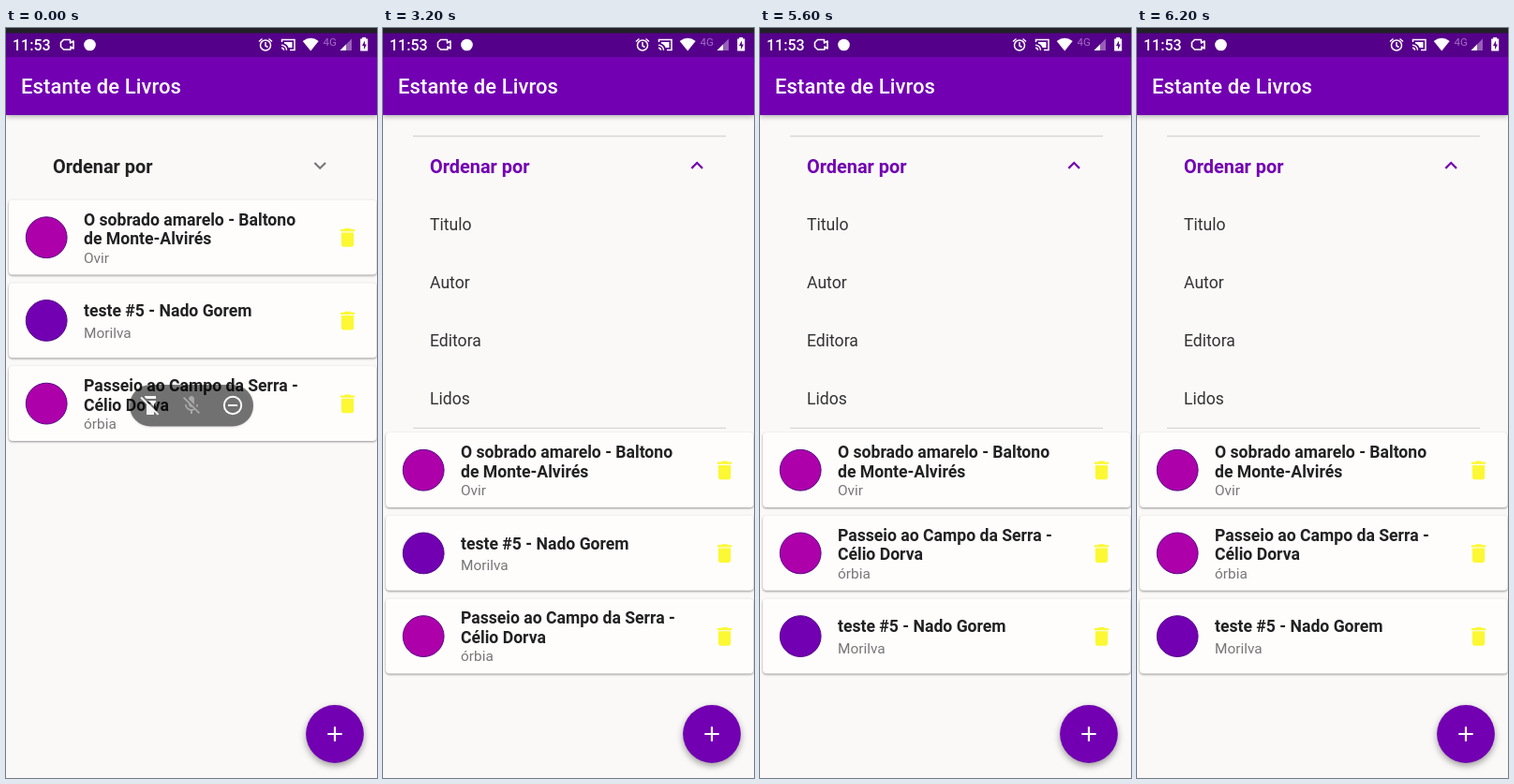
An HTML page for the animation above (8 s loop, 396 px wide and 801 px high).

```html
<!DOCTYPE html>
<html lang="pt-BR">
<head>
<meta charset="utf-8">
<title>Estante de Livros</title>
<style>
  html, body { margin: 0; width: 100%; height: 100%; overflow: hidden; background: #fbf9f8; }
  svg { display: block; width: 100%; height: 100%; font-family: Roboto, sans-serif; }
  .name { font-size: 17.6px; font-weight: 700; fill: #212121; }
  .publisher { font-size: 15.4px; fill: #787676; }
  .option { font-size: 17.6px; fill: #333; }
  .card { fill: #fefdfc; filter: drop-shadow(0 1.2px 1.2px rgba(0, 0, 0, .42)); }
  .bar { filter: drop-shadow(0 2.5px 2.5px rgba(0, 0, 0, .28)); }
  .fab { filter: drop-shadow(0 3px 3.5px rgba(0, 0, 0, .38)); }
  .line { fill: none; stroke: #fff; }
</style>
</head>
<body>
<svg viewBox="0 0 396 801" preserveAspectRatio="none">
  <rect width="396" height="801" fill="#fbf9f8"/>

  <g class="bar">
    <rect width="396" height="93" fill="#7200b2"/>
  </g>
  <rect width="396" height="31" fill="#55008a"/>
  <rect width="396" height="5.5" fill="#222126"/>
  <text x="16" y="70" font-size="22" font-weight="500" letter-spacing=".1" fill="#fff">Estante de Livros</text>

  <!-- status bar -->
  <g fill="#fff">
    <text x="7" y="23.6" font-size="16" font-weight="500">11:53</text>
    <path class="line" stroke-width="1.6" stroke-linejoin="round" d="M61.5 12.5h7v3.5l3.5-2v8l-3-2v3h-7.500l-3-3v-4.500z"/>
    <circle cx="89.500" cy="18" r="6.300"/>
    <g class="line" stroke-width="1.500">
      <circle cx="277" cy="18.500" r="5.500"/>
      <path d="M277 15v4l2.500 1.500M270 14.500l3.500-3M284 14.500l-3.500-3"/>
      <path d="M294.500 15v-2.500h13.500v11h-5M294 18.200a5.500 5.500 0 0 1 5.500 5.500M294 21.200a2.500 2.500 0 0 1 2.500 2.500"/>
    </g>
    <path d="M297 15h8.500v6h-4q-1-3.500-4.500-4.500z"/>
    <path d="M316.700 14q8.500-6.500 17 0l-8.500 10.500z"/>
    <text x="338.500" y="18.800" font-size="11.500" fill="#a56cc8">4G</text>
    <path d="M369 11.500v12.500h-12.500z" fill="#9660b8"/>
    <path d="M363 17.500v6.500h-6.500z"/>
    <path fill-rule="evenodd" d="M380.200 11.500v-1.500h4v1.500h2v13h-8v-13zM383 13.500l-3 5.500h2v4l3-5.500h-2z"/>
  </g>

  <!-- sort panel -->
  <text id="sort" x="50" y="154.500" font-size="19.900" font-weight="700">Ordenar por</text>
  <path id="chevron" d="M7.410 8.590 12 13.170l4.590-4.580L18 10l-6 6-6-6z"/>
  <g id="options">
    <path d="M32 115.500h334M32 427.300h334" stroke="#d9d7d6" stroke-width="1.300"/>
  </g>

  <g id="books"></g>

  <circle class="fab" cx="351" cy="754" r="30.900" fill="#7200b2"/>
  <path class="line" stroke-width="2.200" d="M343.300 754h15.400M351 746.300v15.400"/>

  <!-- recorder controls -->
  <g id="recorder">
    <rect x="132" y="381" width="132" height="44.500" rx="22" fill="#000" fill-opacity=".5" style="filter:drop-shadow(0 1px 1px rgba(0,0,0,.2))"/>
    <path transform="translate(142 391)" fill="#f4f4f4" d="M18 5V2H6v1.170L7.830 5zM16 11l2-3V7H9.830L16 13.170zM2.810 2.810 1.390 4.220 8 10.830V22h8v-3.170l3.780 3.780 1.410-1.410z"/>
    <path transform="translate(186 391)" fill="#aaa8a9" d="M19 11h-1.700c0 .74-.16 1.430-.43 2.050l1.230 1.230c.56-.98.9-2.090.9-3.280zM14.980 11.170V5c0-1.660-1.320-3-2.980-3S9 3.340 9 5v.18zM4.270 3 3 4.270l6.010 6.010V11c0 1.660 1.330 3 2.990 3l.65-.08 1.660 1.660c-.71.33-1.500.52-2.310.52-2.760 0-5.300-2.100-5.300-5.100H5c0 3.410 2.720 6.230 6 6.720V21h2v-3.280c.91-.13 1.770-.45 2.540-.9L19.730 21 21 19.730z"/>
    <circle class="line" cx="242" cy="403" r="9.200" stroke-width="1.900"/>
    <path class="line" stroke-width="2" d="M237 403h10"/>
  </g>
</svg>

<script>
const LOOP = 8000, PURPLE = '#7200b2', MAGENTA = '#ae00aa';
const STEPS = [
  { at: 0, recorder: true, open: false, order: [0, 1, 2] },
  { at: 100, recorder: false, open: false, order: [0, 1, 2] },
  { at: 3200, recorder: false, open: true, order: [0, 1, 2] },
  { at: 5600, recorder: false, open: true, order: [0, 2, 1] }
];
const BOOKS = [
  { lines: ['O sobrado amarelo - Baltono', 'de Monte-Alvirés'], publisher: 'Ovir', color: MAGENTA },
  { lines: ['teste #5 - Nado Gorem'], publisher: 'Morilva', color: PURPLE },
  { lines: ['Passeio ao Campo da Serra -', 'Célio Dorva'], publisher: 'órbia', color: MAGENTA }
];
const TRASH = 'M6 19c0 1.1.9 2 2 2h8c1.1 0 2-.9 2-2V7H6zM19 4h-3.5l-1-1h-5l-1 1H5v2h14z';

const el = id => document.getElementById(id);
const label = (cls, x, y, text) => `<text class="${cls}" x="${x}" y="${y}">${text}</text>`;

function bookCard({ lines, publisher, color }) {
  const single = lines.length === 1;
  const top = single ? 36 : 27;
  const names = lines.map((line, i) => label('name', 83, top + i * 20.7, line)).join('');
  return `<g><rect class="card" x="3" width="392.5" height="80" rx="4"/>
    <circle cx="43.2" cy="40.2" r="21.9" fill="${color}" stroke="#560888"/>
    ${names}${label('publisher', 83, single ? 58.5 : 67, publisher)}
    <path d="${TRASH}" fill="#fcf834" transform="translate(351.4 27.2) scale(1.1)"/></g>`;
}

el('books').innerHTML = BOOKS.map(bookCard).join('');
['Titulo', 'Autor', 'Editora', 'Lidos'].forEach((text, i) =>
  el('options').insertAdjacentHTML('beforeend', label('option', 50, 215.5 + i * 62.2, text)));

let shown;
function show(step) {
  if (step === shown) return;
  shown = step;
  const { recorder, open, order } = step;
  el('recorder').style.display = recorder ? '' : 'none';
  el('options').style.display = open ? '' : 'none';
  el('sort').setAttribute('fill', open ? PURPLE : '#212121');
  el('chevron').setAttribute('fill', open ? PURPLE : '#777');
  el('chevron').setAttribute('transform',
    `translate(335.2 146.9) rotate(${open ? 180 : 0}) scale(1.1) translate(-12 -12)`);
  order.forEach((book, slot) => el('books').children[book]
    .setAttribute('transform', `translate(0 ${(open ? 432 : 183.5) + slot * 88.7})`));
}

const start = performance.now();
function tick() {
  const t = (performance.now() - start) % LOOP;
  show(STEPS.findLast(step => step.at <= t));
  requestAnimationFrame(tick);
}
tick();
</script>
</body>
</html>
```
